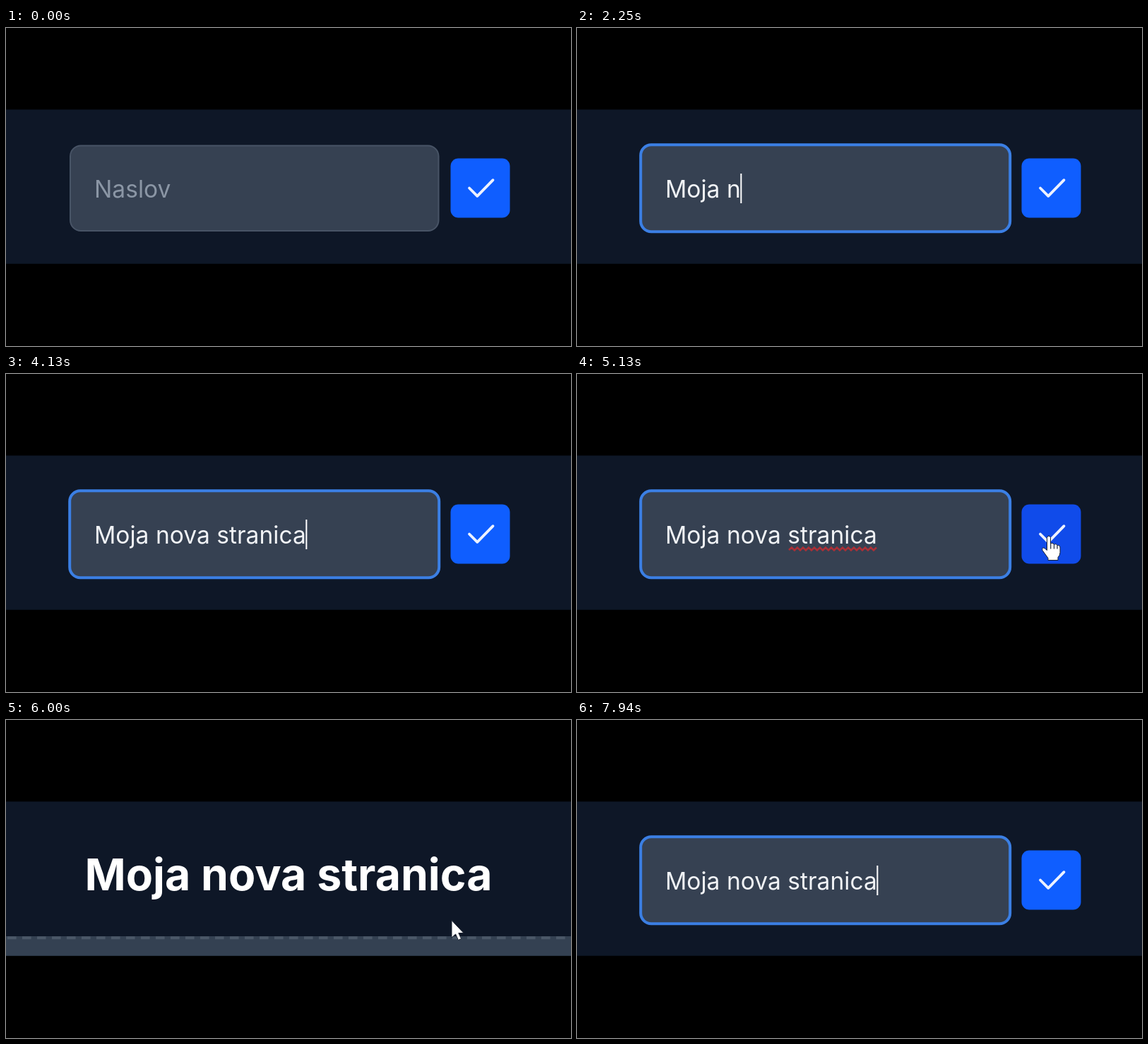
Recreate the animation shown at these times as an HTML page. Size 800x450 px, loop 8000 ms.

```html
<!DOCTYPE html>
<html lang="hr">
<head>
<meta charset="utf-8">
<title>Naslov</title>
<style>
  html, body { margin: 0; width: 100%; height: 100%; overflow: hidden; background: #000; }
  svg { display: block; width: 100vw; height: 100vh; }
  text { font-family: Inter, Roboto, sans-serif; white-space: pre; }
</style>
</head>
<body>
<svg viewBox="0 0 800 450">
  <rect width="800" height="450" fill="#000"/>
  <rect y="115.400" width="800" height="218.300" fill="#0e1727"/>

  <g id="form">
    <rect id="field" fill="#364152"/>
    <text id="value" x="125" y="239.8" font-size="33.6"></text>
    <path id="squiggle" fill="none" stroke="#aa3037" stroke-width="2.6"/>
    <rect id="caret" y="206" width="2" height="42" fill="#fff"/>
    <rect id="button" x="629.5" y="184.5" width="84" height="84" rx="11"/>
    <path d="M656 226.5l11.3 11.3L689.5 215.2" fill="none" stroke="#edf2ff" stroke-width="3.8" stroke-linecap="round" stroke-linejoin="round"/>
  </g>

  <g id="page">
    <rect y="306" width="800" height="27.7" fill="#344152"/>
    <path d="M0 308.2H800" stroke="#4b5868" stroke-width="4" stroke-dasharray="12.6 8.4" stroke-dashoffset="-2"/>
    <text x="111.5" y="241.3" font-size="62.5" font-weight="700" fill="#fff">Moja nova stranica</text>
    <path id="underline" d="M112 248.7H202M229 248.7H692.5" stroke="#fff" stroke-width="5.4"/>
    <g id="pencil" transform="translate(714.5 181) scale(1.75)" fill="none" stroke="#929baa" stroke-width="2" stroke-linecap="round" stroke-linejoin="round">
      <path d="M12 20h9M16.4 3.6a2.1 2.1 0 0 1 3 3L7.4 18.6a2 2 0 0 1-.9.5l-2.9.9a.5.5 0 0 1-.6-.6l.8-2.9a2 2 0 0 1 .5-.9z"/>
    </g>
  </g>

  <g id="cursor" stroke-linejoin="round">
    <path id="arrow" d="M0 0V24.5L5.6 19.5L9.5 28L13.6 26L9.8 18H17Z" fill="#fff" stroke="#18202e" stroke-width="1"/>
    <g id="hand">
      <path d="M-2.5 2Q0 -3 2.5 2V11Q5 8 7.5 12Q10 9.5 12 13Q16 12 16 17V23Q16 27 13 30V34H-1V31L-9 20Q-10 15 -6 17L-2.5 20Z" fill="#fff" stroke="#18202e" stroke-width="1"/>
      <path d="M2.7 10V18M7.5 12V18M12 13.5V18" stroke="#394150" stroke-width="1.4"/>
    </g>
  </g>
</svg>
<script>
const LOOP = 8000, TITLE = "Moja nova stranica";
const FOCUS = 1000, TYPE = 1490, STEP = 150, SPELL = 4900, PRESS = 5100, SAVE = 5350, EDIT = 7440;
const BLINK = 530;

// Pointer stops: time, x, y
const route = [
  [4850, 618, 264], [5010, 668, 229.5], [5560, 668, 229.5], [5860, 634, 286],
  [6000, 631, 283.5], [6110, 618, 289], [6280, 560, 246], [6750, 404, 219.5], [EDIT, 404, 219.5]
];

const $ = id => document.getElementById(id);
const show = (id, on) => $(id).setAttribute("display", on ? "inline" : "none");
const set = (id, attrs) => {
  for (const key in attrs) $(id).setAttribute(key, attrs[key]);
};

let wave = "M300 249";
for (let i = 1; i <= 31; i++) wave += `L${300 + i * 4} ${i % 2 ? 245.5 : 249.5}`;
set("squiggle", { d: wave });

function pointer(t) {
  const i = route.findIndex(stop => stop[0] > t);
  if (i < 1) return null;
  const [t0, x0, y0] = route[i - 1], [t1, x1, y1] = route[i];
  const p = (t - t0) / (t1 - t0), e = p * p * (3 - 2 * p);
  return { x: x0 + (x1 - x0) * e, y: y0 + (y1 - y0) * e };
}

function drawForm(t, hover) {
  const again = t >= EDIT;
  const count = again ? TITLE.length
    : Math.max(0, Math.min(TITLE.length, Math.floor((t - TYPE) / STEP) + 1));
  const focused = t >= FOCUS;
  const value = $("value");
  value.textContent = count ? TITLE.slice(0, count) : "Naslov";
  value.setAttribute("fill", count ? "#f1f3f6" : "#8b96a5");

  set("field", focused
    ? { x: 90.2, y: 165.2, width: 523, height: 123, rx: 15, stroke: "#3b7fe4", "stroke-width": 4 }
    : { x: 91, y: 166.5, width: 521.5, height: 120.5, rx: 15, stroke: "#485466", "stroke-width": 2 });

  const last = again ? EDIT : count ? TYPE + (count - 1) * STEP : FOCUS;
  const lit = Math.floor((t - last) / BLINK) % 2 === 0;
  show("caret", focused && lit && (again || t < PRESS));
  set("caret", { x: 124.6 + (count ? value.getComputedTextLength() : 0) });
  show("squiggle", t >= SPELL && !again);
  set("button", { fill: hover ? "#104bea" : "#0f5eff" });
}

// Opacity eases in and out as the pointer enters and leaves the heading
function pencilOpacity(t) {
  let sum = 0;
  for (let i = 0; i < 10; i++) {
    const s = t - i * 15, at = pointer(s);
    if (s >= SAVE && at && at.y < 253) sum++;
  }
  return sum / 10;
}

function render(t) {
  const at = pointer(t);
  const saved = t >= SAVE && t < EDIT;
  const onButton = !saved && !!at && at.x >= 630;
  const onTitle = saved && !!at && at.y < 253;

  show("form", !saved);
  show("page", saved);
  if (saved) {
    show("underline", onTitle);
    set("pencil", { opacity: pencilOpacity(t) });
  } else {
    drawForm(t, onButton);
  }

  show("cursor", !!at);
  if (at) {
    set("cursor", { transform: `translate(${at.x} ${at.y})` });
    show("hand", onButton || onTitle);
    show("arrow", !onButton && !onTitle);
  }
}

function tick() {
  render(performance.now() % LOOP);
  requestAnimationFrame(tick);
}
tick();
</script>
</body>
</html>
```
